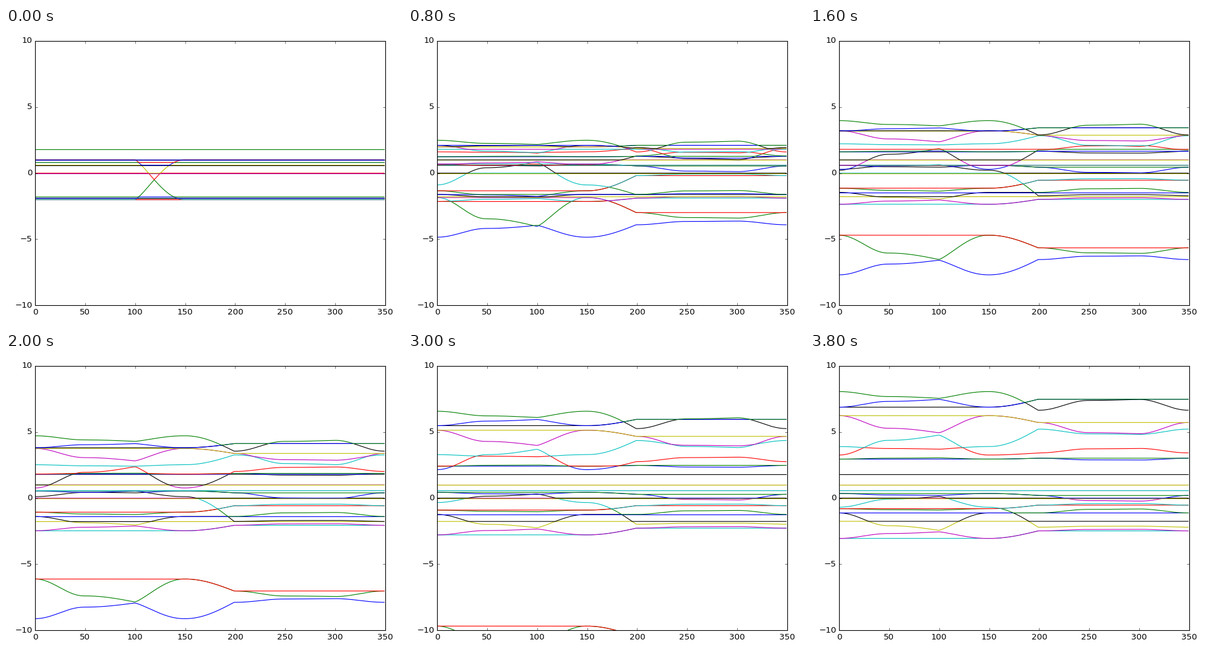
Recreate the animation shown at these times as a matplotlib script. Size 640 by 480 pixels, loop 4000 ms.

```python
import numpy as np
import matplotlib.pyplot as plt
from matplotlib.animation import FuncAnimation

plt.style.use("classic")
plt.rcParams.update({"font.family": "DejaVu Sans", "figure.facecolor": "white",
                     "savefig.dpi": "figure"})

STEPS, SEG = 20, 50
u = np.linspace(0, 1, SEG)
smooth = (1 - np.cos(np.pi * u)) / 2
leave = 1 - np.cos(np.pi * u / 2)
arrive = np.sin(np.pi * u / 2) ** 1.25
# Corner points: G X M G Z R A Z
EASES = [smooth, leave, arrive, leave, smooth, leave, smooth]
IN_PLANE = np.array([0, .74, 1, 0, 0, 0, 0, 0])
TOP = np.array([0, 0, 0, 0, 0, .9, 1, 0])
LIFT = np.array([0, 0, 0, 0, 1, 1, 1, 1])


def corners(n):
    """Energies of all moving bands at the corner points, coupling step n."""
    t = n / (STEPS - 1)
    ramp = min(n / 4, 1)
    rows = []

    def band(level, reach, swing=0, lift=0, top=0, bend=1, fade=.5, count=1):
        """Level drifting by reach; the last copy also disperses in plane."""
        base = level + reach * t ** bend
        gain = ramp * max(t, .2) ** fade
        for i in range(count):
            tilt = swing * gain * IN_PLANE + top * ramp * TOP
            rows.append(base + lift * gain * LIFT + tilt * (i == count - 1))

    # Two bands that repel each other along G-Z
    band(1, -1.69, .82, fade=1)
    band(-2, 5.26, 1.5, fade=-.1)
    pair = np.sort(rows, axis=0)
    ends = -2 + .4 * ramp - .6 * t ** 2, 1 + 2.42 * t ** 1.35
    for row, ordered, end, top in zip(rows, pair, ends, (.08, .34)):
        row[3] = ordered[3]
        row[4:] = end + top * ramp * TOP[4:]

    # Wide bands going up
    band(1, 7.06, -.51, -1.41, .82, fade=.3)
    band(1, 5.88, .59, .6, bend=1.15, fade=1, count=2)
    band(1, 5.24, -1.29, -.52, -.85, count=2)
    band(1, 2.9, -.2, 1.32, -.4, fade=.9)
    # Narrow bands
    band(1, 1.95, .1, .07, -.14, bend=1.35, count=2)
    band(.8, -.45, -.15, -.15, -.43, bend=.9, fade=0, count=2)
    band(-1.9, 1.1, -.1, .27, .12, bend=.43, fade=-.93, count=2)
    band(-1.9, .78, -1.31, 0, .3, bend=.65, fade=1.1, count=2)
    band(-2, -1.05, .5, .57, .12, bend=1.25, count=2)
    # Deep bands going down
    band(1, -13.53, -1.47, -.77, -.42, fade=-.25, count=2)
    band(-2, -13.53, 1.43, 1.5, .28, fade=.3)
    # Levels that do not couple
    for level, count in (0, 3), (.6, 2), (1, 2), (1.8, 1), (-1.8, 1):
        band(level, -.025 * level * (level in (.6, -1.8)), count=count)
    return np.array(rows)


def bands(n):
    e = corners(n)[:, :, None]
    curves = [e[:, i] + (e[:, i + 1] - e[:, i]) * ease
              for i, ease in enumerate(EASES)]
    return np.sort(np.hstack(curves), axis=0)


fig, ax = plt.subplots(figsize=(8, 6), dpi=80)
x = np.arange(SEG * len(EASES))
lines = [ax.plot(x, y, color="bgrcmyk"[i % 7])[0]
         for i, y in enumerate(bands(0))]
ax.set(xlim=(0, 350), ylim=(-10, 10),
       xticks=range(0, 351, 50), yticks=range(-10, 11, 5))
fig.tight_layout()


def update(n):
    for line, y in zip(lines, bands(n)):
        line.set_ydata(y)
    return lines


anim = FuncAnimation(fig, update, frames=STEPS, init_func=lambda: update(0),
                     interval=200, repeat=True, repeat_delay=0)
plt.show()
```
